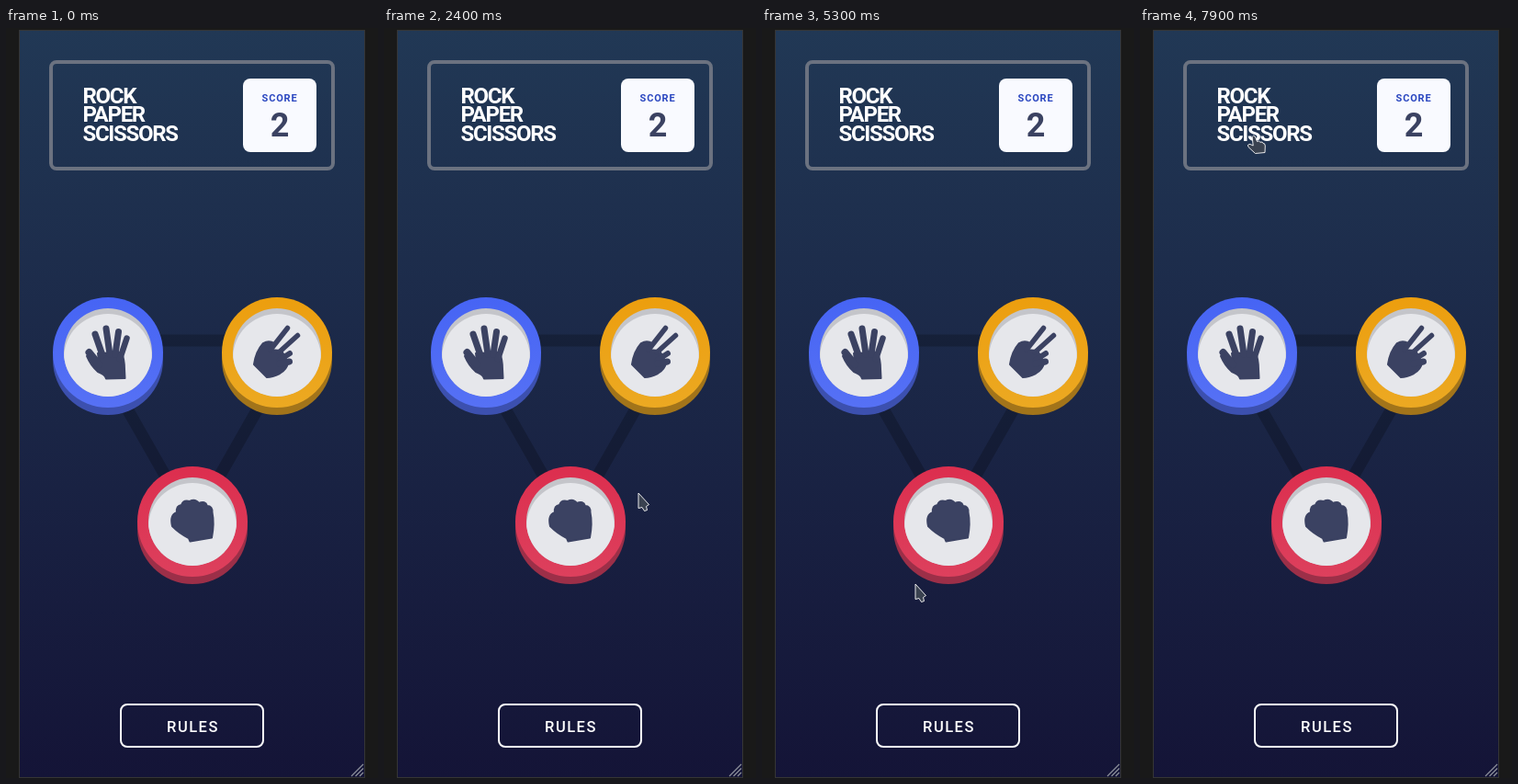
Write an HTML page that moves like this. It is 405 px wide and 816 px high and loops after 8000 ms.

```html
<!DOCTYPE html>
<html lang="en">
<head>
<meta charset="utf-8">
<title>Rock Paper Scissors</title>
<style>
  html, body { margin: 0; width: 100%; height: 100%; overflow: hidden; background: #191919; }
  svg { display: block; width: 100%; height: 100%; }
  text { font-family: Roboto, sans-serif; font-weight: 700; }
  .mid { text-anchor: middle; }
  .logo { font-size: 24px; letter-spacing: -1.3px; fill: #fff; }
  .label { font-size: 14.5px; letter-spacing: -.6px; fill: #fff; }
  .beats { font: 700 12.4px "Noto Serif", serif; fill: #b0b3c7; }
  .hand { fill: currentColor; stroke: currentColor; stroke-linecap: round; stroke-linejoin: round; }
  .line { fill: none; stroke: #b3b5c8; stroke-width: 4; }
</style>
</head>
<body>
<svg id="stage" viewBox="0 0 405 816"></svg>
<script>
const LOOP = 8000, STEP = 100;
const INK = '#3b4262';

// Hands around (0,0): a palm outline plus fingers as [path, width]
const hands = {
  paper: {
    palm: 'M-11 1L15 0Q18 8 18 18L18.500 28L-2 28.500Q-3 24 -11 21Q-19 14 -23 4L-17 2L-10 9Z',
    fingers: [['M-20.500 0L-10 13', 8], ['M-14 -20L-6 3', 7], ['M-2 -26L2 2', 7],
              ['M11.500 -22.500L8 2', 7], ['M20.500 -15.500L13 7', 6.500]]
  },
  scissors: {
    palm: 'M-25 13Q-23 -1 -15 -10Q-10 -13 -5 -11L-9 -3L5 -2L12 11Q11 18 3 23Q-5 27 -11 27Z',
    fingers: [['M11.500 -26.500L-7 -3', 5.500], ['M22.500 -18.500L2 0', 5.500],
              ['M14 1L3 8', 6], ['M13.500 10L3 12', 7]]
  },
  rock: {
    palm: 'M-22 5Q-25 -7 -17 -10Q-18 -17 -12 -18Q-10 -24 -3 -22Q3 -25 7 -20Q14 -23 16 -17' +
          'Q22 -17 21.500 -10Q24 2 21 17.500L-2.500 21.500L-4 18Q-14 13 -22 5Z',
    fingers: []
  }
};
const colors = {
  paper: ['#4664f4', '#5671f5', '#3c50af'],
  scissors: ['#ec9e0e', '#eca922', '#a2741a'],
  rock: ['#dc2e4e', '#dd405d', '#9c2f48']
};

const hand = kind => `<g class="hand"><path d="${hands[kind].palm}" stroke-width="2"/>` +
  hands[kind].fingers.map(([d, w]) => `<path d="${d}" stroke-width="${w}"/>`).join('') + '</g>';

const chip = (kind, x, y, scale = 1) => `
  <g transform="translate(${x} ${y}) scale(${scale})" color="${INK}">
    <circle cy="8" r="60" fill="${colors[kind][2]}"/>
    <circle r="60" fill="url(#${kind})"/>
    <circle r="48" fill="#c4c5ca"/>
    <circle cy="6" r="48" fill="#e6e7eb" clip-path="url(#face)"/>
    ${hand(kind)}
  </g>`;

const ruleChip = (kind, x, y) => `
  <g transform="translate(${x} ${y})" color="#8a8fae">
    <ellipse rx="53.500" ry="55" fill="#b3b5c8"/>
    <circle cy="-1.500" r="41.200" fill="#e0e3ed"/>
    <g transform="translate(0 .5) scale(.74)">${hand(kind)}</g>
  </g>`;

const text = (str, x, y, attrs) => `<text x="${x}" y="${y}" ${attrs}>${str}</text>`;

const labels = x => text('YOU PICKED', x, 254, 'class="mid label"') +
  text('THE HOUSE PICKED', 286.5, 254, 'class="mid label"');

const playAgain = y => `<rect x="157" y="${y}" width="91" height="56" rx="8" fill="#fff"/>` +
  text('PLAY AGAIN', 203, y + 35,
    `class="mid" font-size="14.500" letter-spacing=".8" fill="${INK}" style="font-weight:500"`);

const picking = kind => labels(115) + chip(kind, 115, 383, 1.25) +
  '<circle cx="287" cy="387" r="64" fill="#151536"/>' + playAgain(531);

const halo = [135, 115, 95].map(r =>
  `<circle cx="287" cy="383" r="${r}" fill="#fff" opacity=".04"/>`).join('');

const result = (mine, x, house, words, rings = '') => rings + labels(x) +
  chip(mine, x, 383, 1.25) + chip(house, 287, 383, 1.25) +
  text(words, 202.5, 570, 'class="mid" font-size="40" letter-spacing="-1.500" fill="#fff"') + playAgain(583);

const scenes = {
  home: '<path d="M89.500 340H316.500L203 539Z" fill="none" stroke="#000" stroke-opacity=".22" stroke-width="13"/>' +
    chip('paper', 111, 353) + chip('scissors', 295, 353) + chip('rock', 203, 537),
  pickScissors: picking('scissors'),
  lose: result('scissors', 115, 'rock', 'YOU LOSE', halo),
  pickPaper: picking('paper'),
  draw: result('paper', 118, 'paper', 'DRAW'),
  rules: '<rect x="15" y="3" width="375" height="812" fill="#fff"/>' +
    text('RULES', 201.5, 130, `class="mid" font-size="48" letter-spacing="-3.500" fill="${INK}"`) +
    ruleChip('paper', 104, 327) + ruleChip('scissors', 300.5, 327) + ruleChip('rock', 202.5, 487) +
    `<path class="line" d="M228 323H179M188 314L179 323L188 332
      M134 389L162 430M147 427L162 430L164 416M249 431L277 391M263 393L277 391L279 404"/>` +
    [[206, 303], [112, 419], [307, 419]].map(([x, y]) => text('BEATS', x, y, 'class="mid beats"')).join('') +
    '<path d="M196 697L211 711M211 697L196 711" stroke="#cfcfd2" stroke-width="3"/>'
};

const gradient = (id, [from, to]) => `<linearGradient id="${id}" x2="0" y2="1">
  <stop stop-color="${from}"/><stop offset="1" stop-color="${to}"/></linearGradient>`;

const stage = document.getElementById('stage');
stage.innerHTML = `
  <defs>
    ${gradient('sky', ['#213855', '#141437'])}
    ${Object.keys(colors).map(k => gradient(k, colors[k])).join('')}
    <clipPath id="face"><circle r="48"/></clipPath>
    <clipPath id="page"><rect x="15" y="3" width="375" height="812"/></clipPath>
  </defs>
  <rect width="405" height="816" fill="#191919"/>
  <rect x="14.500" y="2.500" width="376" height="813" fill="url(#sky)" stroke="#353535"/>
  <g clip-path="url(#page)">
    <rect x="49" y="37" width="307" height="116" rx="6" fill="none" stroke="#6b7280" stroke-width="4"/>
    ${['ROCK', 'PAPER', 'SCISSORS'].map((w, i) => text(w, 83.5, 81.5 + i * 20.7, 'class="logo"')).join('')}
    <rect x="258" y="55" width="80" height="80" rx="8" fill="#f9faff"/>
    ${text('SCORE', 298, 80, 'class="mid" font-size="11" letter-spacing=".8" fill="#2a46c0"')}
    ${text('2', 298, 118, `class="mid" font-size="36" fill="${INK}"`)}
    <rect x="125" y="736" width="155" height="46" rx="7" fill="none" stroke="#fff" stroke-width="2"/>
    ${text('RULES', 203.5, 766, 'class="mid" font-size="16.500" letter-spacing="1.500" fill="#fff" style="font-weight:500"')}
    ${Object.keys(scenes).map(k => `<g id="${k}">${scenes[k]}</g>`).join('')}
  </g>
  <path d="M376 814L389 801M380.500 814L389 805.500M385 814L389 810" stroke="#8d919c" stroke-width="1.200"/>
  <g id="cursor" stroke="#fff" stroke-linejoin="round">
    <path id="arrow" d="M0 0V16.500L4 15.500L6.500 19.500L9.500 18.500L8.500 14.500L11.500 12.500Z"/>
    <path id="pointer" d="M-1.800 1.500Q-.5 -1 1.300 1L3.500 6.500L5.500 6L7 7.300L9 7L10 8.500Q12 8 12.300 11
      L12 18.500L1.500 19.500L-6 12.500Q-7.500 9 -4 9.500L-.8 11Z"/>
  </g>`;

// [start, scene]
const shots = [[0, 'home'], [1200, 'rules'], [2300, 'home'], [3000, 'pickScissors'], [4000, 'lose'],
  [5300, 'home'], [5800, 'pickPaper'], [6800, 'draw'], [7000, 'home']];

// [time, x, y] of the cursor tip
const track = [
  [200, 8, 521], [500, 150, 556], [700, 209, 625], [1000, 184, 749], [1100, 184, 750],
  [1300, 184, 748], [1700, 238, 580], [2100, 195, 693], [2300, 195, 693],
  [2400, 277, 506], [2500, 277, 506], [2600, 290, 306], [2700, 290, 306], [2800, 289, 305],
  [3100, 289, 305], [3400, 236, 479], [4000, 190, 609], [4100, 162, 597], [4200, 166, 592],
  [4300, 166, 592], [4600, 161, 623], [5200, 161, 623], [5300, 167, 605], [5700, 121, 394],
  [5900, 121, 394], [6100, 147, 549], [6300, 170, 614], [6400, 170, 614], [6800, 165, 608],
  [7000, 165, 608], [7800, 124, 118], [7900, 124, 117]
];

const near = (x, y, cx, cy, r) => Math.hypot(x - cx, y - cy) < r;
const within = (x, y, l, t, r, b) => x >= l && x <= r && y >= t && y <= b;

function clickable(scene, x, y) {
  if (scene === 'rules') return near(x, y, 203, 703, 14);
  if (within(x, y, 124, 735, 281, 783) || within(x, y, 84, 62, 187, 125)) return true;
  if (scene === 'home') return near(x, y, 111, 353, 60) || near(x, y, 295, 353, 60) || near(x, y, 203, 537, 60);
  const top = scene.startsWith('pick') ? 531 : 583;
  return within(x, y, 157, top, 248, top + 56);
}

function tip(t) {
  const i = track.findIndex(k => k[0] > t);
  if (i < 0) return track[track.length - 1].slice(1);
  const [t0, x0, y0] = track[i - 1], [t1, x1, y1] = track[i];
  const p = (t - t0) / (t1 - t0);
  return [x0 + (x1 - x0) * p, y0 + (y1 - y0) * p];
}

const el = id => document.getElementById(id);
const show = (id, on) => { el(id).style.display = on ? '' : 'none'; };

function render(ms) {
  const t = Math.floor((ms % LOOP) / STEP) * STEP;
  const scene = shots.filter(s => s[0] <= t).pop()[1];
  for (const k in scenes) show(k, k === scene);

  const visible = t >= track[0][0];
  show('cursor', visible);
  if (!visible) return;
  const [x, y] = tip(t), link = clickable(scene, x, y);
  el('cursor').setAttribute('transform', `translate(${x} ${y})`);
  el('cursor').setAttribute('fill', scene === 'rules' ? '#333d57' : '#3a4250');
  el('cursor').setAttribute('stroke', scene === 'rules' ? '#e4e5ea' : '#e8e8ea');
  show('pointer', link);
  show('arrow', !link);
}

const began = performance.now();
function tick() {
  render(performance.now() - began);
  requestAnimationFrame(tick);
}
tick();
</script>
</body>
</html>
```
